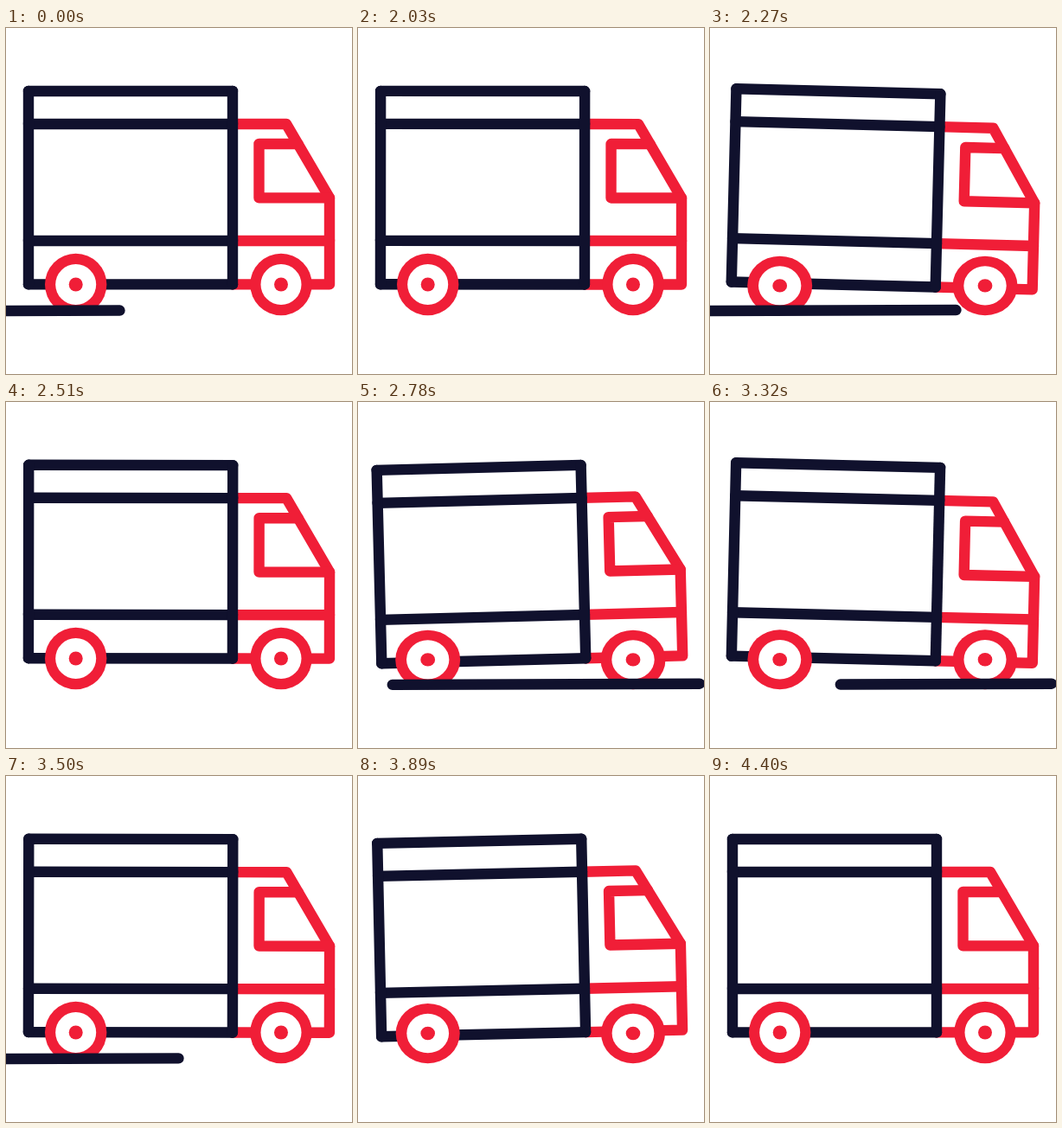
Animation, 400 px wide and 400 px high, one loop 4.43 s. Source, as an HTML page with a canvas:

```html
<!DOCTYPE html>
<html lang="en">
<head>
<meta charset="utf-8">
<title>Delivery truck</title>
<style>
  html, body { margin: 0; width: 100%; height: 100%; overflow: hidden; background: #fff; }
  canvas { display: block; width: 400px; height: 400px; }
</style>
</head>
<body>
<canvas id="stage" width="400" height="400"></canvas>
<script>
const ctx = document.getElementById('stage').getContext('2d');
const NAVY = '#10112d', RED = '#f01e37';
const LOOP = 4430, START = 2030, STEP = 30;
const SWING_IN = 270, SWING = 496, SWINGS = 3, SETTLE = 540;
const MAX_TILT = 0.0254;
const PIVOT = { x: 198, y: 246 };

// Body outline, shared by the box and the cab
const BACK = 26, JOINT = 262, FRONT = 374;
const ROOF = 73, SHELF = 111, BELT = 246, FLOOR = 296.4;

const clamp = p => Math.min(1, Math.max(0, p));
const ease = p => (1 - Math.cos(Math.PI * clamp(p))) / 2;

// Swings in, rocks back and forth, then settles level
function tiltAt(t) {
  const sinceFirstPeak = t - 2000 - SWING_IN;
  const rocking = SWING * SWINGS;
  const swing = Math.cos(Math.PI * Math.min(rocking, Math.max(0, sinceFirstPeak)) / SWING);
  return swing * ease(1 + sinceFirstPeak / SWING_IN)
    * (1 - ease((sinceFirstPeak - rocking) / SETTLE));
}

function line(color, ...points) {
  ctx.strokeStyle = color;
  ctx.beginPath();
  points.forEach(([x, y]) => ctx.lineTo(x, y));
  ctx.stroke();
}

function disc(radius, color) {
  ctx.fillStyle = color;
  ctx.beginPath();
  ctx.arc(0, 0, radius, 0, Math.PI * 2);
  ctx.fill();
}

function drawCab() {
  const hoodY = 196.4, windowX = 292.5, windowY = 134, roofEnd = 324;
  const slope = (FRONT - roofEnd) / (hoodY - SHELF);
  const pillarX = roofEnd + slope * (windowY - SHELF);
  line(RED, [JOINT, SHELF], [roofEnd, SHELF], [FRONT, hoodY], [FRONT, FLOOR], [JOINT, FLOOR]);
  line(RED, [JOINT, BELT], [FRONT, BELT]);
  line(RED, [pillarX, windowY], [windowX, windowY], [windowX, hoodY], [FRONT, hoodY]);
}

function drawBox() {
  for (const y of [ROOF, SHELF, BELT, FLOOR]) line(NAVY, [BACK, y], [JOINT, y]);
  for (const x of [BACK, JOINT]) line(NAVY, [x, ROOF], [x, FLOOR]);
}

function drawBody(tilt, squash) {
  ctx.save();
  ctx.translate(PIVOT.x, PIVOT.y + 1.5 * squash);
  ctx.rotate(tilt * MAX_TILT);
  ctx.translate(-PIVOT.x, -PIVOT.y);
  drawCab();
  drawBox();
  ctx.restore();
}

// Wheels flatten against the ground
function drawWheel(x, squash) {
  ctx.save();
  ctx.translate(x, 332);
  ctx.scale(1 + 0.05 * squash, 1 - 0.04 * squash);
  ctx.translate(0, -35.5);
  disc(35.7, RED);
  disc(23.5, '#fff');
  disc(8, RED);
  ctx.restore();
}

// A stroke grows from the right edge, then runs off to the left
function drawRoad(t) {
  const pass = Math.min(2, Math.floor((t - START) / 590));
  const age = t - START - pass * 590;
  if (age <= 0) return;
  const left = Math.max(-20, 395 - 2.22 * age);
  const right = 395 - 1.7 * Math.max(0, age - 175);
  const roadY = x => 327 - x / 300;
  if (right > -7) line(NAVY, [left, roadY(left)], [right, roadY(right)]);
}

function draw(now) {
  let t = now % LOOP;
  t = t < START ? 0 : START + Math.floor((t - START) / STEP) * STEP;
  const tilt = tiltAt(t), squash = tilt * tilt;

  ctx.fillStyle = '#fff';
  ctx.fillRect(0, 0, 400, 400);
  ctx.lineWidth = 12.4;
  ctx.lineCap = ctx.lineJoin = 'round';
  drawBody(tilt, squash);
  for (const x of [80.7, 318]) drawWheel(x, squash);
  drawRoad(t);
}

function tick() {
  draw(performance.now());
  requestAnimationFrame(tick);
}
tick();
</script>
</body>
</html>
```
